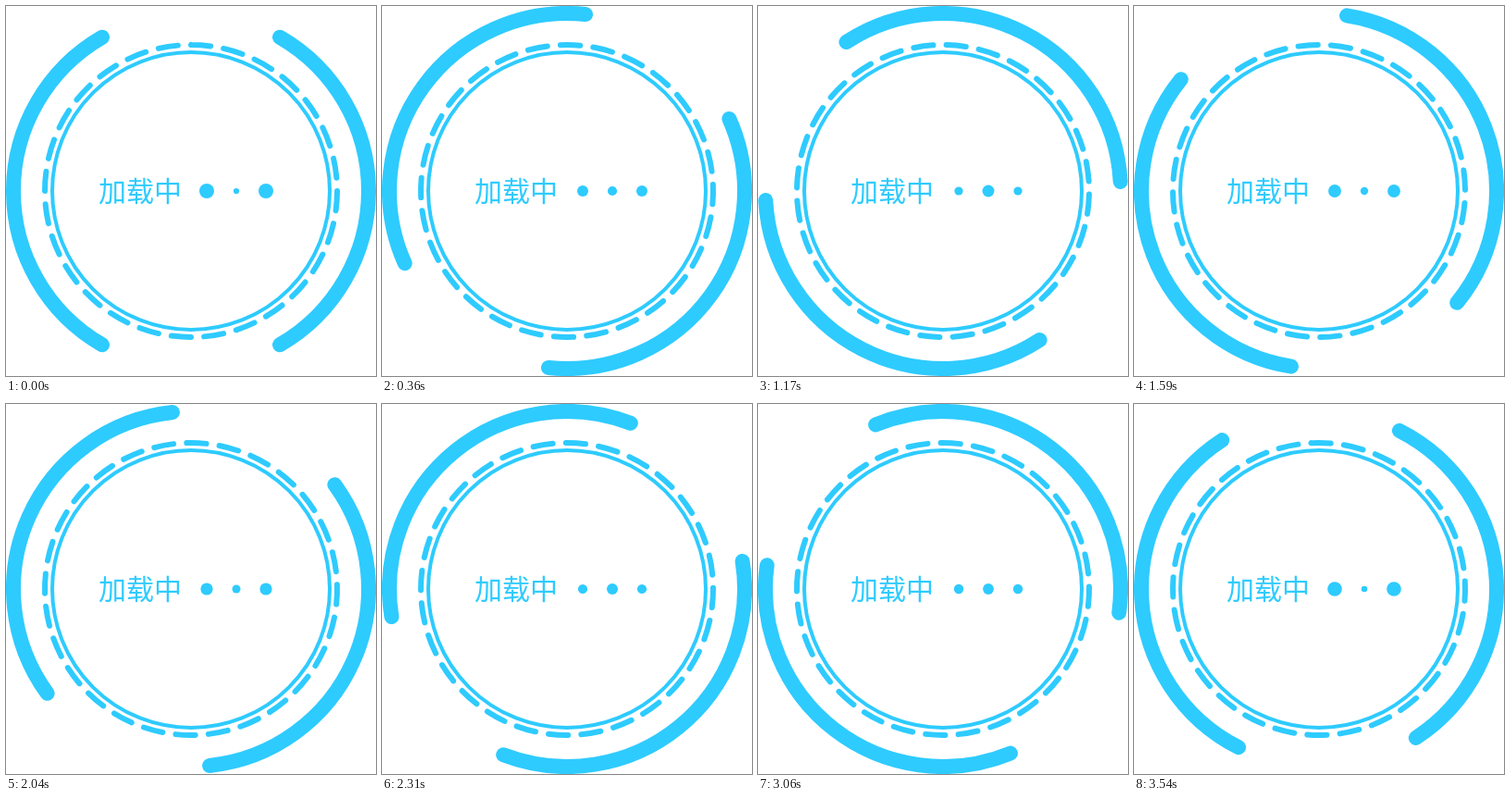
Recreate the animation shown at these times as an HTML page. Size 400 px wide and 400 px high, loop 3570 ms.

```html
<!DOCTYPE html>
<html lang="zh-CN">
<head>
<meta charset="utf-8">
<title>加载中</title>
<style>
  html, body { margin: 0; width: 100%; height: 100%; overflow: hidden; background: #fff; }
  svg { display: block; width: 400px; height: 400px; }
  .line { fill: none; stroke: #2ecbff; stroke-linecap: round; }
  .fill { fill: #2ecbff; }
  text { font: 300 30px "Noto Sans CJK SC", "Noto Sans CJK", sans-serif; }
</style>
</head>
<body>
<svg viewBox="0 0 400 400">
  <circle class="line" cx="200" cy="200" r="150" stroke-width="4"/>
  <g id="spin">
    <circle class="line" cx="200" cy="200" r="158" stroke-width="6"
            pathLength="28" stroke-dasharray=".6 .4"/>
    <path class="line" stroke-width="16"
          d="M296 33.72A192 192 0 0 1 296 366.28M104 366.28A192 192 0 0 1 104 33.72"/>
  </g>
  <text class="fill" x="100" y="211">加载中</text>
  <g class="fill">
    <circle class="dot" cx="217" cy="200" r="8"/>
    <circle class="dot" cx="249" cy="200" r="3"/>
    <circle class="dot" cx="281" cy="200" r="8"/>
  </g>
</svg>
<script>
  const LOOP = 3570, STEP = 30, PULSE = LOOP / 2;
  const MIN_R = 3.1, MAX_R = 8;
  const spin = document.getElementById('spin');
  const dots = document.querySelectorAll('.dot');

  // Three turns of 120 degrees; the last one is a step shorter.
  const angleAt = t => t < 2400 ? t / 10 : 240 + (t - 2400) / (LOOP - 2400) * 120;

  function draw(now) {
    const t = Math.floor(now % LOOP / STEP) * STEP;
    spin.setAttribute('transform', `rotate(${angleAt(t)} 200 200)`);

    const big = Math.abs(1 - 2 * (t % PULSE) / PULSE);
    dots.forEach((dot, i) => {
      const k = i === 1 ? 1 - big : big;
      dot.setAttribute('r', MIN_R + (MAX_R - MIN_R) * k);
    });
  }

  const start = performance.now();
  function tick() {
    draw(performance.now() - start);
    requestAnimationFrame(tick);
  }
  tick();
</script>
</body>
</html>
```
